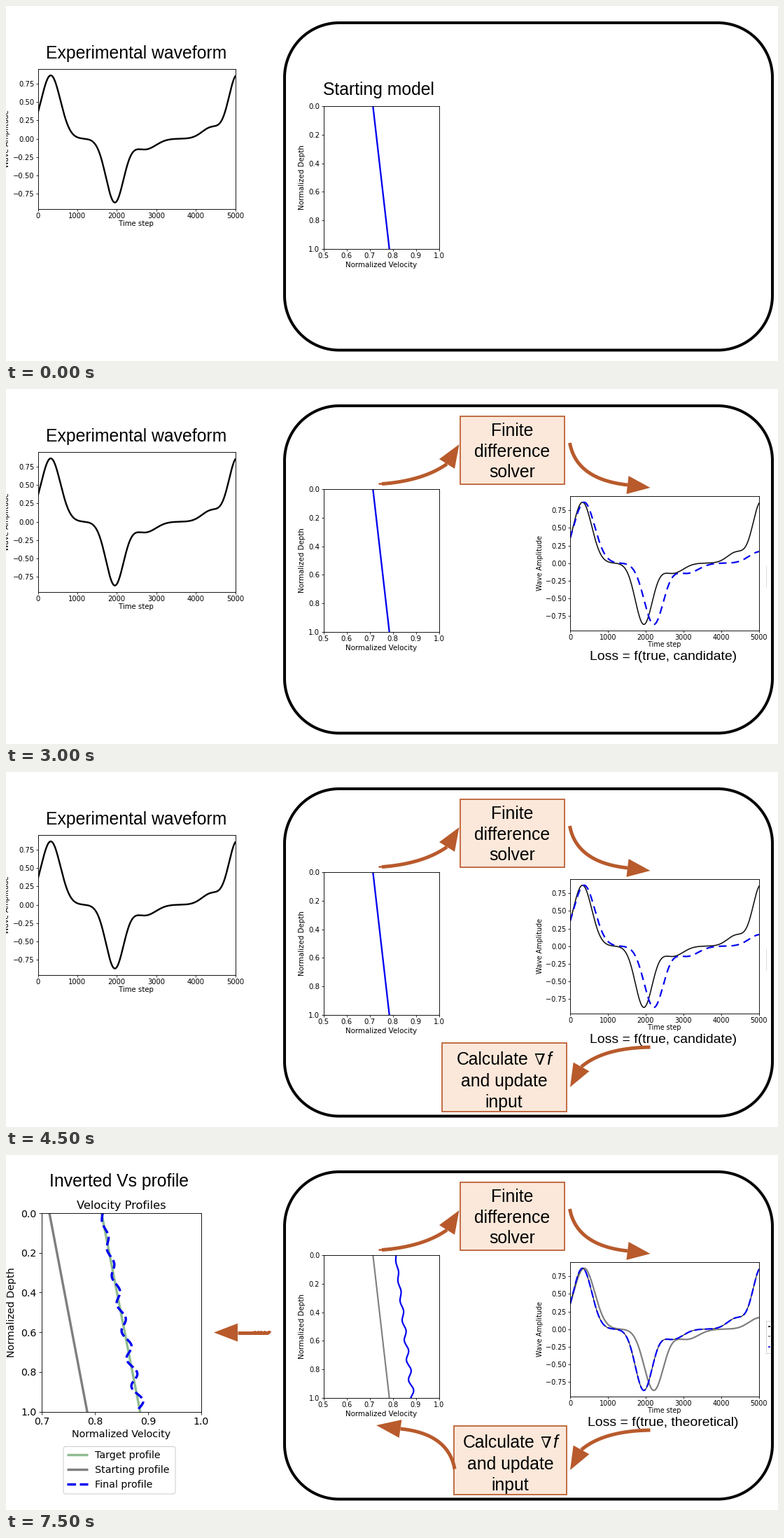
A matplotlib script that plays this animation: 1103x507 px, repeating every 9000 ms.

```python
import numpy as np
import matplotlib.pyplot as plt
from matplotlib.animation import FuncAnimation
from matplotlib.patches import FancyBboxPatch, Polygon, Rectangle

W, H, DPI = 1103, 507, 100
PT = 72 / DPI  # points per pixel
STEPS, STEP_MS = 6, 1500
ALL = range(STEPS)

RUST, CREAM, BLUE, GRAY, GREEN = "#b85a2c", "#fbe8da", "#0000f0", "#7f7f7f", "#8fbc8f"
SANS, PLOT = "Liberation Sans", "DejaVu Sans"
BIG, SMALL = 24.8, 19.4

fig = plt.figure(figsize=(W / DPI, H / DPI), dpi=DPI, facecolor="white")
stage = fig.add_axes([0, 0, 1, 1], zorder=5)
stage.set(xlim=(0, W), ylim=(H, 0))
stage.axis("off")

shown = []  # (artist, steps in which it is visible)


def show(artist, steps):
    shown.append((artist, set(steps)))
    return artist


def label(x, y, s, px, steps, font=SANS, va="baseline", ha="center", **kw):
    show(stage.text(x, y, s, fontsize=px * PT, family=font, va=va, ha=ha,
                    **{"zorder": 6, **kw}), steps)


def patch(shape, steps):
    show(stage.add_patch(shape), steps)


def stroke(xs, ys, steps, color, px, z=3, **kw):
    show(stage.plot(xs, ys, color=color, lw=px * PT, zorder=z, solid_capstyle="butt",
                    dash_capstyle="butt", **kw)[0], steps)


# Waveforms and velocity profiles
def bump(x, height, center, width):
    return height * np.exp(-((x - center) / width) ** 2 / 2)


def rise(x, height, center, width):
    return height / (1 + np.exp((center - x) / width))


def waveform(t):
    return (bump(t, .866, 327, 245) - bump(t, .87, 1950, 225) - bump(t, .145, 2720, 270)
            + bump(t, .155, 4400, 240) + bump(t, .87, 5050, 215))


t = np.linspace(0, 5000, 600)
wave = waveform(t)
candidate = waveform(t / 1.135)

depth = np.linspace(0, 1, 400)
start = .7145 + .071 * depth
target = .8125 + .0725 * depth
final = target + .001 + (.003 + .006 * depth) * np.cos(2 * np.pi * (depth - .944) / .1385)
update = (.702 + .05 * (1 - np.exp(-depth / .06)) + rise(depth, .052, .405, .018)
          + rise(depth, .1, .645, .018) - bump(depth, .01, .32, .05)
          - bump(depth, .012, .56, .03) - .01 * depth ** 6)


def axes(box, xlim, ylim, xticks, yticks, fmt, px, steps, tick=3, pad=2.3):
    x0, y0, x1, y1 = box
    ax = fig.add_axes([x0 / W, 1 - y1 / H, (x1 - x0) / W, (y1 - y0) / H], zorder=2)
    ax.set(xlim=xlim, ylim=ylim)
    ax.set_xticks(xticks, [fmt[0] % v for v in xticks])
    ax.set_yticks(yticks, [(fmt[1] % v).replace("-", "\u2212") for v in yticks])
    ax.tick_params(length=tick * PT, width=.8 * PT, pad=pad * PT, labelsize=px * PT)
    for text in ax.get_xticklabels() + ax.get_yticklabels():
        text.set_family(PLOT)
    for spine in ax.spines.values():
        spine.set_linewidth(.9 * PT)
    return show(ax, steps)


def draw(ax, x, y, color, px, **kw):
    ax.plot(x, y, color=color, lw=px * PT, dash_capstyle="butt", **kw)


def wave_axes(box, px, steps):
    return axes(box, (0, 5000), (-.957, .95), range(0, 5001, 1000),
                np.arange(-.75, .8, .25), ("%d", "%.2f"), px, steps)


def depth_axes(box, left, px, steps, **kw):
    return axes(box, (left, 1), (1, 0), np.arange(left, 1.01, .1), np.arange(0, 1.01, .2),
                ("%.1f", "%.1f"), px, steps, **kw)


def plot_labels(xlab, xpos, ylab, ypos, px, steps):
    label(*xpos, xlab, px, steps, PLOT, "center", zorder=3)
    label(*ypos, ylab, px, steps, PLOT, "center", zorder=3, rotation=90)


# Measured waveform
ax = wave_axes((45.5, 90.3, 327.5, 289.5), 10, range(5))
draw(ax, t, wave, "black", 2.4)
plot_labels("Time step", (186, 311.3), "Wave Amplitude", (1, 190), 10.1, range(5))
label(186, 75.5, "Experimental waveform", BIG, range(5))

# Velocity model inside the loop
MODEL = (453.5, 143, 618.5, 347)
ax = depth_axes(MODEL, .5, 10.1, range(4))
draw(ax, start, depth, BLUE, 2.3)
for step, profile, px in ((4, update, 10.1), (5, final, 9.8)):
    ax = depth_axes(MODEL, .5, px, [step])
    draw(ax, start, depth, GRAY, 2.1)
    draw(ax, profile, depth, BLUE, 2.2)
plot_labels("Normalized Velocity", (536, 370), "Normalized Depth", (423.5, 245), 10.2, ALL)
label(532, 127, "Starting model", BIG, [0])
stroke([492, 582], [138, 138], [4], "#dddddd", 1, z=1, ls=(0, (6, 2)))

# Waveform comparison
COMPARE = (806, 153.3, 1076, 344.7)
ax = wave_axes(COMPARE, 9.6, [2, 3, 4])
draw(ax, t, wave, "#111111", 1.6)
draw(ax, t, candidate, BLUE, 2.2, ls=(0, (5, 3.2)))
ax = wave_axes(COMPARE, 9.6, [5])
draw(ax, t, candidate, GRAY, 2.2)
draw(ax, t, wave, "black", 1)
draw(ax, t, wave, BLUE, 2.2, ls=(0, (5, 1.8)))
plot_labels("Time step", (941, 365.5), "Wave Amplitude", (763, 249), 9.6, range(2, 6))
patch(Rectangle((756, 150), 334, 222, fc="white", alpha=.67, lw=0, zorder=4), [4])
for name, steps in (("candidate", [2, 3]), ("theoretical", [4, 5])):
    label(939, 387, f"Loss = f(true, {name})", SMALL, steps)

# Cut-off legend at the right edge
stroke([1086, 1086], [252, 283], [2, 3], "#dddddd", 1)
stroke([1092, 1086, 1086, 1092], [237, 237, 283, 283], [5], "#d0d0d0", 1)
for i, color in enumerate(("black", GRAY, BLUE)):
    y = 244.5 + 14.5 * i
    stroke([1089, 1092], [y, y], [5], color, 1.6)

# Final profile
ax = depth_axes((51, 83, 279, 366.5), .7, 14.1, [5], tick=4.3, pad=3.4)
draw(ax, target, depth, GREEN, 3.4)
draw(ax, start, depth, GRAY, 3.4)
draw(ax, final, depth, BLUE, 3.4, ls="--")
plot_labels("Normalized Velocity", (165, 398.5), "Normalized Depth", (8, 225), 14.2, [5])
label(164.5, 72, "Velocity Profiles", 16.2, [5], PLOT, "center")
label(161.5, 45.5, "Inverted Vs profile", BIG, [5])
patch(FancyBboxPatch((82, 416.5), 160, 67.5, boxstyle="round,pad=0,rounding_size=3",
                     fc="white", ec="#cccccc", lw=PT, zorder=2), [5])
for i, (name, color, ls) in enumerate((("Target", GREEN, "-"), ("Starting", GRAY, "-"),
                                       ("Final", BLUE, "--"))):
    y = 428 + 21.1 * i
    stroke([87, 117], [y, y], [5], color, 3.4, ls=ls)
    label(127, y + 5, name + " profile", 14.2, [5], PLOT, ha="left")

# Rounded frame: a circle pulled apart at its quadrants
a = np.linspace(.001, 2 * np.pi, 400)
frame = np.column_stack([746.5 + 270.5 * np.sign(np.cos(a)) + 78 * np.cos(a),
                         257.75 + 155.75 * np.sign(np.sin(a)) + 78 * np.sin(a)])
patch(Polygon(frame, fill=False, ec="black", lw=4 * PT, zorder=5), ALL)
patch(Polygon([(1040, 507), (1103, 497), (1103, 507)], fc="#f7f7f7", lw=0, zorder=0), [1])


def panel(x0, y0, x1, y1, steps):
    patch(Rectangle((x0, y0), x1 - x0, y1 - y0, fc=CREAM, ec="#bd6035",
                    lw=1.8 * PT, zorder=5), steps)


def arrow(tail, bend, neck, tip, steps, half=13):
    """Quadratic curve from tail to neck, then a triangular head up to tip."""
    tail, bend, neck, tip = map(np.array, (tail, bend, neck, tip))
    u = np.linspace(0, 1, 40)[:, None]
    path = (1 - u) ** 2 * tail + 2 * u * (1 - u) * bend + u ** 2 * neck
    stroke(*path.T, steps, RUST, 5, z=6)
    way = (tip - neck) / np.hypot(*(tip - neck))
    side = half * np.array([-way[1], way[0]])
    patch(Polygon([tip, neck + side, neck - side], fc=RUST, lw=0, zorder=6), steps)


panel(648.5, 38.5, 798, 136, range(1, 6))
for i, s in enumerate(("Finite", "difference", "solver")):
    label(723, 67 + 29.6 * i, s, BIG, range(1, 6))

for left, cx, steps in ((622.5, 711.5, [3]), (640, 720.5, [4, 5])):
    panel(left, 387, 801, 484.5, steps)
    label(cx - 67.5, 418, "Calculate", BIG, steps, ha="left")
    label(cx + 43, 418, "\u2207", 22.5, steps, "DejaVu Serif", ha="left")
    label(cx + 60.5, 418, "f", BIG, steps, style="italic", ha="left")
    label(cx, 449, "and update", BIG, steps)
    label(cx, 479, "input", BIG, steps)

stroke([532, 550], [134.5, 134.5], range(1, 6), RUST, 2.6, z=6)
arrow((537, 135.5), (596, 131), (630, 107), (647.5, 79), range(1, 6))
arrow((805.5, 77), (815, 129), (888, 137), (920.5, 141), range(2, 6))
arrow((920.5, 393), (854, 394), (822, 421), (806, 450), range(3, 6))
arrow((641, 448.5), (632, 398), (563.5, 391), (529, 386), [4, 5])
arrow((377, 253.5), (354, 253.5), (331, 253.5), (297, 253.5), [5])


def update_step(step):
    for artist, steps in shown:
        artist.set_visible(step in steps)
    return []


anim = FuncAnimation(fig, update_step, frames=STEPS, interval=STEP_MS, repeat=True,
                     repeat_delay=0, init_func=lambda: update_step(0), blit=False)
plt.show()
```
